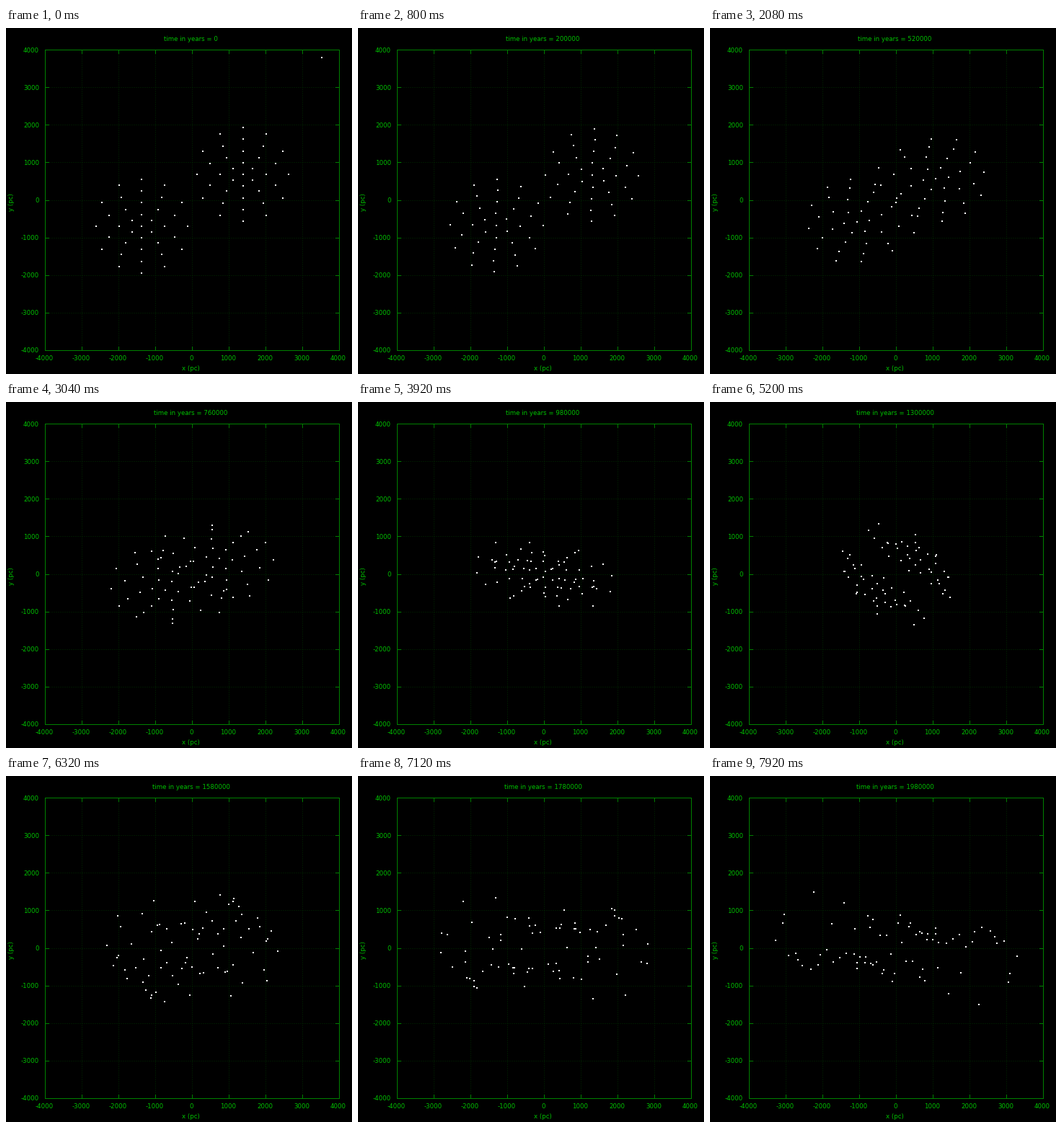
Recreate the animation shown at these times as a matplotlib script. Size 480x480 px, loop 8 s.

```python
import numpy as np
import matplotlib.pyplot as plt
from matplotlib.animation import FuncAnimation

SIZE, DPI = 480, 80
PT = 72 / DPI                       # points per pixel
FRAMES, INTERVAL = 100, 80
YEARS_PER_FRAME = 20000
LEFT, RIGHT, TOP, BOTTOM = 54.5, 462.5, 30.5, 447.5
TEXT, BORDER, GRID = "#00c000", "#008000", "#002c00"

# Lengths in pc, times in Myr
RING_STEP = 312.5
RING_SPIN = np.radians([312, 237, 197, 157])
GM = 1.55e10
EDGE = 1250
FRICTION = 0.25
SUBSTEPS = 10


def to_px(x, y):
    px = LEFT + (np.asarray(x) + 4000) / 8000 * (RIGHT - LEFT)
    py = BOTTOM - (np.asarray(y) + 4000) / 8000 * (BOTTOM - TOP)
    return px, py


def pull(offset):
    """Acceleration towards an extended halo lying at -offset."""
    r = np.hypot(offset[..., 0], offset[..., 1])[..., None]
    inside = np.interp(r, RING_STEP * np.arange(5),
                       [30, 24.6, 15.9, 11.3, GM / EDGE ** 3])
    return -offset * np.where(r < EDGE, inside, GM / np.maximum(r, EDGE) ** 3)


def make_disc(center, drift):
    """Rings of 6, 8, 10 and 12 stars turning clockwise around the core."""
    pos, vel = [], []
    for ring, spin in enumerate(RING_SPIN, start=1):
        count = 2 * ring + 4
        a = 2 * np.pi * np.arange(count) / count
        r = RING_STEP * ring
        pos.append(r * np.column_stack([np.sin(a), np.cos(a)]))
        vel.append(r * spin * np.column_stack([np.cos(a), -np.sin(a)]))
    return center + np.vstack(pos), drift + np.vstack(vel)


def simulate():
    """Follow one galaxy; the other is its mirror image through the origin."""
    core, drift = np.array([1375.0, 687.5]), np.array([-160.0, 0.0])
    stars, speed = make_disc(core, drift)
    dt = YEARS_PER_FRAME / 1e6 / SUBSTEPS
    history = []
    for _ in range(FRAMES):
        galaxy = np.vstack([core, stars])
        history.append(np.vstack([galaxy, -galaxy]))
        for _ in range(SUBSTEPS):
            core = core + drift * dt / 2
            stars = stars + speed * dt / 2
            speed = speed + dt * (pull(stars - core) + pull(stars + core))
            drag = FRICTION * drift if np.hypot(*core) < 900 else 0
            drift = drift + dt * (pull(2 * core) - drag)
            core = core + drift * dt / 2
            stars = stars + speed * dt / 2
    return history


fig = plt.figure(figsize=(SIZE / DPI, SIZE / DPI), dpi=DPI, facecolor="black")
ax = fig.add_axes([0, 0, 1, 1])
ax.set_xlim(0, SIZE)
ax.set_ylim(SIZE, 0)
ax.axis("off")


def line(xs, ys, color=BORDER, **style):
    # Pixel centres without snapping give crisp one-pixel lines
    ax.plot(xs, ys, color=color, lw=PT, snap=False, **style)


def label(x, y, text, ha="center", **style):
    style.setdefault("va", "baseline")
    return ax.text(x, y, text, ha=ha, color=TEXT, fontsize=8.6 * PT,
                   family="DejaVu Sans", **style)


for value in range(-4000, 4001, 1000):
    px, py = (np.floor(p) + 0.5 for p in to_px(value, value))
    if abs(value) < 4000:
        dots = dict(color=GRID, linestyle=(0, (1, 2)), dash_capstyle="butt", zorder=1)
        line([px, px], [TOP, BOTTOM], **dots)
        line([LEFT, RIGHT], [py, py], **dots)
    for edge, inward in ((TOP, 5), (BOTTOM, -5)):
        line([px, px], [edge, edge + inward])
    for edge, inward in ((LEFT, 5), (RIGHT, -5)):
        line([edge, edge + inward], [py, py])
    label(px - 1.5, 461, str(value))
    label(46, py + 3, str(value), ha="right")

line([LEFT, RIGHT, RIGHT, LEFT, LEFT], [TOP, TOP, BOTTOM, BOTTOM, TOP],
     solid_joinstyle="miter")
label(256.5, 475, "x (pc)")
label(8, 241.5, "y (pc)", va="center", rotation=90)
title = label(256.5, 18, "")

dot_style = dict(ls="none", marker="s", ms=2 * PT, mew=0, color="white", zorder=5)
points, = ax.plot([], [], **dot_style)
key_point, = ax.plot([437.5], [40.5], **dot_style)
history = simulate()


def update(frame):
    title.set_text(f"time in years = {frame * YEARS_PER_FRAME}")
    points.set_data(*to_px(*history[frame].T))
    key_point.set_visible(frame == 0)
    return title, points, key_point


anim = FuncAnimation(fig, update, frames=FRAMES, interval=INTERVAL,
                     repeat=True, repeat_delay=0, blit=False)
plt.show()
```
